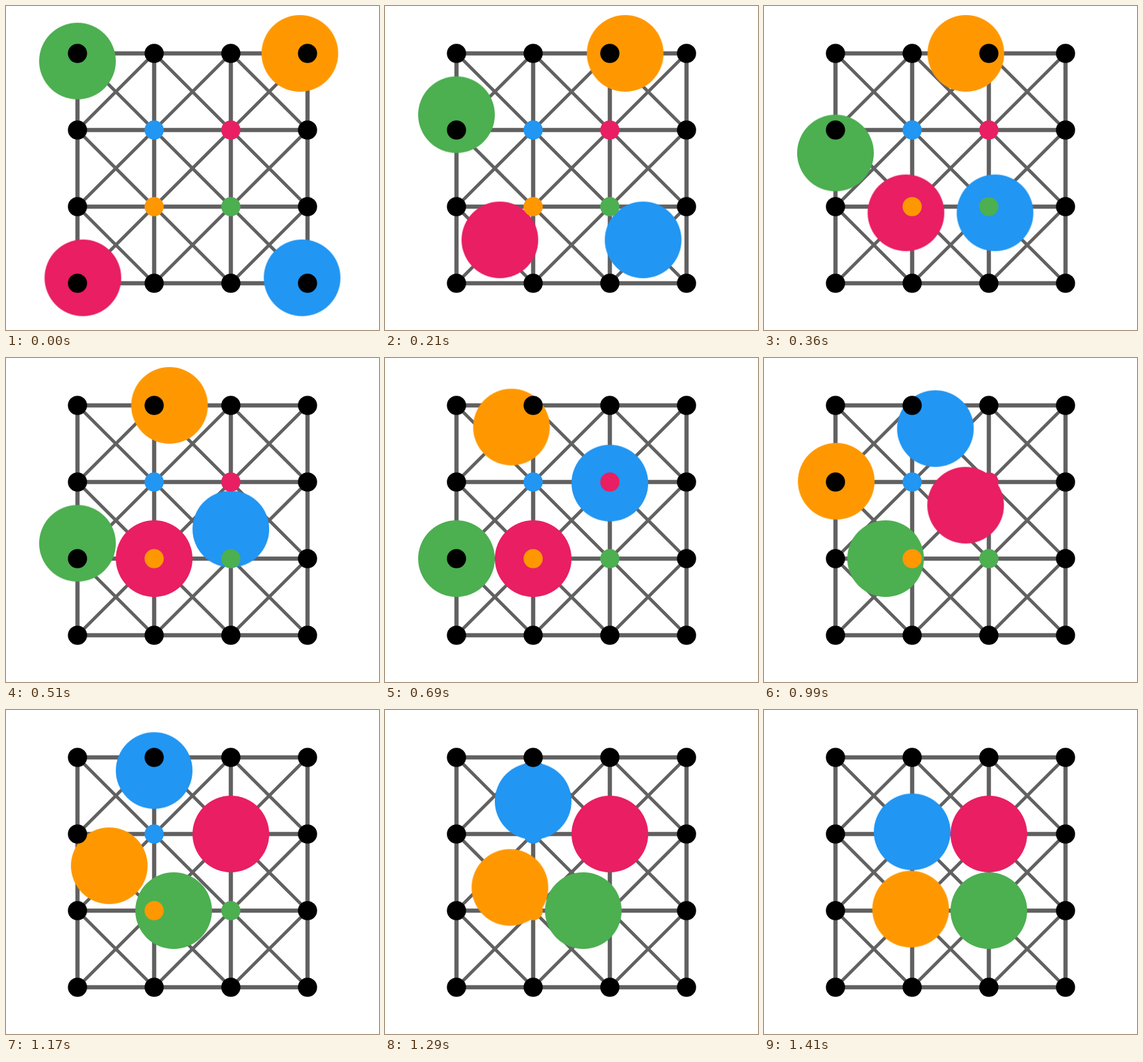
An HTML page for the animation above (1440 ms loop, 574 by 499 pixels).

```html
<!DOCTYPE html>
<html lang="en">
<head>
<meta charset="utf-8">
<title>Discs on a grid</title>
<style>
  html, body { margin: 0; width: 100%; height: 100%; overflow: hidden; background: #fff; }
  svg { display: block; width: 574px; height: 499px; }
</style>
</head>
<body>
<svg id="stage" viewBox="0 0 574 499"></svg>
<script>
const stage = document.getElementById('stage');
const CELL = 118, LEFT = 110, TOP = 73, SIZE = 4;
const STEPS = 48, STEP_MS = 30, SPEED = 0.1; // cells per step
const GREEN = '#4caf50', ORANGE = '#ff9800', BLUE = '#2196f3', PINK = '#e91e63';
const px = col => LEFT + col * CELL;
const py = row => TOP + row * CELL;

function add(tag, attrs) {
  const el = document.createElementNS('http://www.w3.org/2000/svg', tag);
  for (const name in attrs) el.setAttribute(name, attrs[name]);
  return stage.appendChild(el);
}

function line(c1, r1, c2, r2, width) {
  add('line', { x1: px(c1), y1: py(r1), x2: px(c2), y2: py(r2),
    stroke: '#616161', 'stroke-width': width });
}

// Each stop is [column, row, earliest departure step].
const discs = [
  { color: GREEN, stops: [[0, 0], [0, 2, 27.46], [2, 2]] },
  { color: ORANGE, stops: [[3, 0], [1, 0], [0, 1], [1, 2]] },
  { color: BLUE, stops: [[3, 3], [2, 2], [2, 1], [1, 0], [1, 1]] },
  { color: PINK, stops: [[0, 3], [1, 2, 24.14], [2, 1]] }
];

function position(stops, step) {
  let clock = 0;
  for (let i = 0; i < stops.length - 1; i++) {
    const [c1, r1, wait = 0] = stops[i], [c2, r2] = stops[i + 1];
    const start = Math.max(clock, wait);
    const duration = Math.hypot(c2 - c1, r2 - r1) / SPEED;
    if (step < start + duration) {
      const k = Math.max(0, step - start) / duration;
      return [c1 + (c2 - c1) * k, r1 + (r2 - r1) * k];
    }
    clock = start + duration;
  }
  return stops[stops.length - 1];
}

function keyframes(stops) {
  return Array.from({ length: STEPS + 1 }, (_, i) => {
    const [c, r] = position(stops, Math.min(i + 1, STEPS));
    return {
      offset: i / STEPS,
      easing: 'steps(1, end)',
      transform: `translate(${px(c).toFixed(3)}px, ${py(r).toFixed(3)}px)`
    };
  });
}

const last = SIZE - 1;
for (let r = 0; r < last; r++) {
  for (let c = 0; c < last; c++) {
    line(c, r, c + 1, r + 1, 5);
    line(c + 1, r, c, r + 1, 5);
  }
}
for (let i = 0; i < SIZE; i++) {
  line(0, i, last, i, 6.5);
  line(i, 0, i, last, 6.5);
}

for (const { color, stops } of discs) {
  add('circle', { r: CELL / 2, fill: color }).animate(keyframes(stops), {
    duration: STEPS * STEP_MS, iterations: Infinity
  });
}

const goals = { '1,1': BLUE, '2,1': PINK, '1,2': ORANGE, '2,2': GREEN };
for (let r = 0; r < SIZE; r++) {
  for (let c = 0; c < SIZE; c++) {
    add('circle', { cx: px(c), cy: py(r), r: CELL / 8, fill: goals[[c, r]] || '#000' });
  }
}
</script>
</body>
</html>
```
